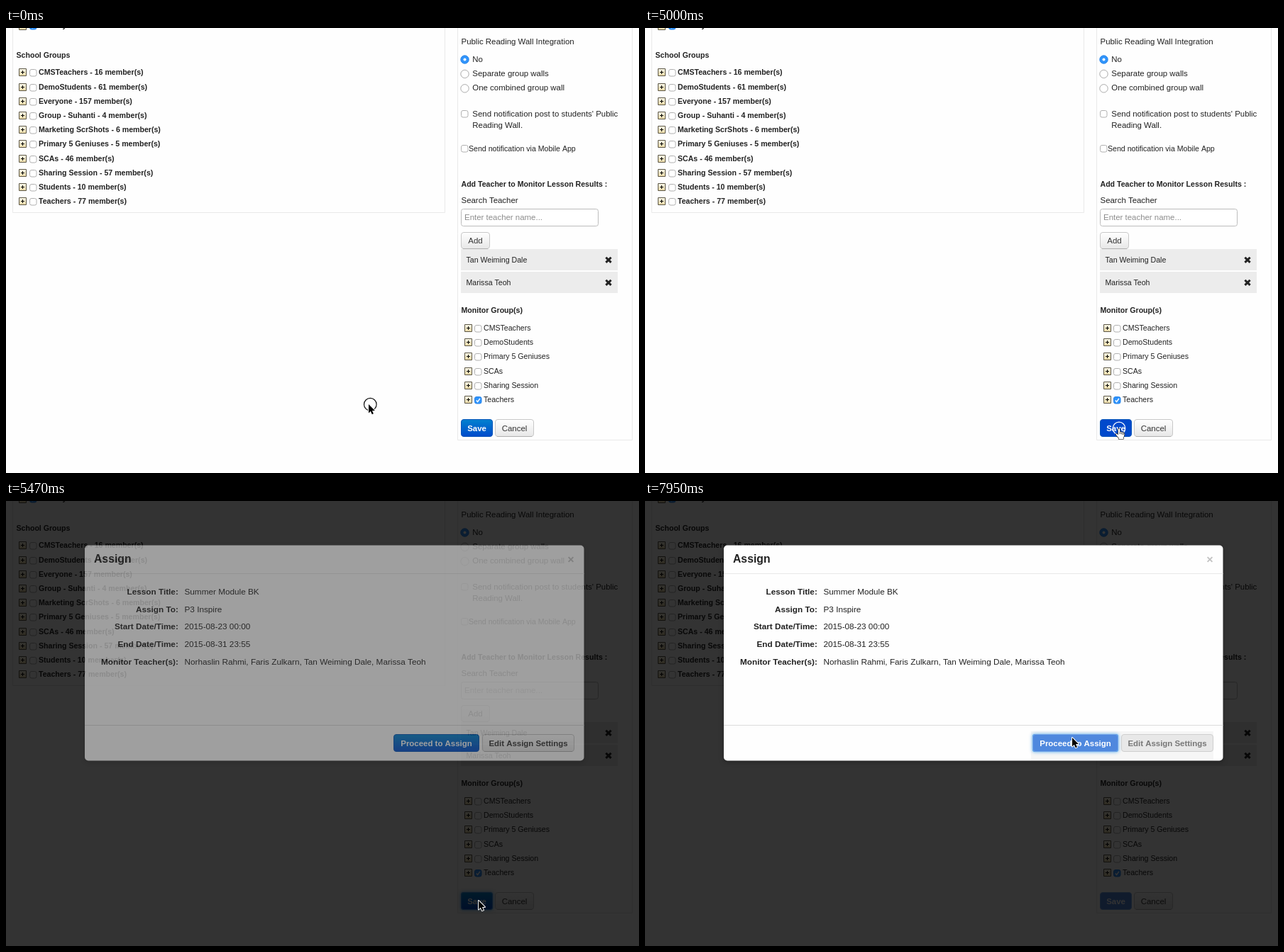
An HTML page with a canvas that plays this animation: 892x628 px, repeating every 8000 ms.

```html
<!DOCTYPE html>
<html lang="en">
<head>
<meta charset="utf-8">
<title>Assign lesson</title>
<style>
html, body { margin: 0; width: 892px; height: 628px; overflow: hidden; background: #fefefe; }
canvas { display: block; }
</style>
</head>
<body>
<canvas id="stage" width="892" height="628"></canvas>
<script>
const W = 892, H = 628, LOOP = 8000;
const main = document.getElementById('stage').getContext('2d');
const layer = Object.assign(document.createElement('canvas'), { width: W, height: H }).getContext('2d');
let g = main;
const FACE = '"Liberation Sans", Arial, sans-serif';
const SMALL = 10.6, BODY = 11.45, DIALOG = 11.75, INK = '#222';
const ROW = 20.23;

const groups = ['CMSTeachers - 16', 'DemoStudents - 61', 'Everyone - 157', 'Group - Suhanti - 4',
  'Marketing ScrShots - 6', 'Primary 5 Geniuses - 5', 'SCAs - 46', 'Sharing Session - 57',
  'Students - 10', 'Teachers - 77'];
const monitored = ['CMSTeachers', 'DemoStudents', 'Primary 5 Geniuses', 'SCAs', 'Sharing Session', 'Teachers'];
const teachers = ['Tan Weiming Dale', 'Marissa Teoh'];
const details = [
  ['Lesson Title:', 'Summer Module BK'],
  ['Assign To:', 'P3 Inspire'],
  ['Start Date/Time:', '2015-08-23 00:00'],
  ['End Date/Time:', '2015-08-31 23:55'],
  ['Monitor Teacher(s):', 'Norhaslin Rahmi, Faris Zulkarn, ' + teachers.join(', ')]
];

function text(s, x, y, size, { bold = false, color = INK, align = 'left' } = {}) {
  g.font = (bold ? 'bold ' : '') + size + 'px ' + FACE;
  g.fillStyle = color;
  g.textAlign = align;
  g.fillText(s, x, y);
}

function rect(x, y, w, h, color) {
  g.fillStyle = color;
  g.fillRect(x, y, w, h);
}

function box(x, y, w, h, r, fill, stroke) {
  g.beginPath();
  g.roundRect(x, y, w, h, r);
  if (fill) { g.fillStyle = fill; g.fill(); }
  if (stroke) { g.strokeStyle = stroke; g.lineWidth = 1; g.stroke(); }
}

function line(pts, color, width) {
  g.beginPath();
  pts.forEach(([x, y], i) => i ? g.lineTo(x, y) : g.moveTo(x, y));
  g.strokeStyle = color;
  g.lineWidth = width;
  g.stroke();
}

function shade(y, h, top, bottom) {
  const s = g.createLinearGradient(0, y, 0, y + h);
  s.addColorStop(0, top);
  s.addColorStop(1, bottom);
  return s;
}

// Paints onto the layer, then lays it over the stage as one translucent sheet.
function fade(alpha, paint) {
  g = layer;
  g.clearRect(0, 0, W, H);
  paint();
  g = main;
  g.globalAlpha = alpha;
  g.drawImage(layer.canvas, 0, 0);
  g.globalAlpha = 1;
}

function plus(x, y) {
  box(x + .5, y + .5, 10, 10, 0, shade(y, 11, '#fffdf0', '#ecd9a4'), '#5a5544');
  rect(x + 3, y + 5, 5, 1, '#000');
  rect(x + 5, y + 3, 1, 5, '#000');
}

function check(x, y, on) {
  box(x + .5, y + .5, 9.5, 9.5, 2.5, on ? '#3094fb' : '#fff', on ? '#2583ea' : '#b0b0b0');
  if (on) line([[x + 2.8, y + 5.5], [x + 4.6, y + 7.6], [x + 7.9, y + 2.8]], '#fff', 1.5);
}

function radio(x, y, on) {
  g.beginPath();
  g.arc(x, y, 5.7, 0, 7);
  g.fillStyle = on ? '#3094fb' : '#fff';
  g.fill();
  g.strokeStyle = on ? '#2583ea' : '#aaa';
  g.lineWidth = 1;
  g.stroke();
  if (!on) return;
  g.beginPath();
  g.arc(x, y, 2, 0, 7);
  g.fillStyle = '#fff';
  g.fill();
}

function plainButton(x, y, w, h, label, bold, off) {
  box(x + .5, y + .5, w - 1, h - 1, 3.5, off ? '#e8e8e8' : shade(y, h, '#fff', '#e7e7e7'), off ? '#cfcfcf' : '#c8c8c8');
  if (!off) rect(x + 3, y + h - 1, w - 6, 1, '#b0b0b0');
  text(label, x + w / 2, y + h / 2 + 4, BODY, { bold, align: 'center', color: off ? '#777' : '#333' });
}

function primaryButton(x, y, w, h, label, { hover, glow, off }) {
  g.save();
  if (glow) {
    g.shadowColor = '#52a8ec';
    g.shadowBlur = 5;
    box(x, y, w, h, 3, '#52a8ec');
    g.shadowBlur = 0;
  }
  const fill = off ? '#4f88de' : hover ? '#0049cc' : shade(y, h, '#0083cf', '#0049cb');
  box(x + .5, y + .5, w - 1, h - 1, 3.5, fill, off ? '#73a5e8' : glow ? '#3c8ce0' : '#0353b8');
  text(label, x + w / 2, y + h / 2 + 4, BODY, { bold: true, align: 'center', color: '#fff' });
  g.restore();
}

function groupPanel() {
  line([[9.5, 0], [9.5, 260.5], [618.5, 260.5], [618.5, 0]], '#e9e9e9', 1);
  plus(18, -8);
  check(33, -8, true);
  text('Primary', 46, 0, SMALL, { bold: true });
  text('School Groups', 14.5, 41.5, SMALL, { bold: true });
  groups.forEach((name, i) => {
    const y = Math.round(66.3 + i * ROW);
    plus(18, y - 9);
    check(33, y - 8, false);
    text(name + ' member(s)', 46, y, SMALL, { bold: true });
  });
}

function settingsPanel(s) {
  line([[636.5, 0], [636.5, 581.5], [882.5, 581.5], [882.5, 0]], '#e9e9e9', 1);
  text('Public Reading Wall Integration', 641.5, 23, BODY);
  ['No', 'Separate group walls', 'One combined group wall'].forEach((label, i) => {
    radio(646.5, 44.5 + i * 20.4, i === 0);
    text(label, 657.3, 48 + i * ROW, BODY);
  });
  check(641, 116, false);
  text("Send notification post to students' Public", 657.3, 125.3, BODY);
  text('Reading Wall.', 657.3, 141, BODY);
  check(641, 165, false);
  text('Send notification via Mobile App', 652, 173.5, SMALL);

  text('Add Teacher to Monitor Lesson Results :', 641.5, 223.5, SMALL, { bold: true });
  text('Search Teacher', 641.5, 246.5, BODY);
  box(641.5, 255.5, 193, 24, 3, '#fff', '#bcbcbc');
  text('Enter teacher name...', 646, 271, BODY, { color: '#8c8c8c' });
  plainButton(641, 288, 41, 24, 'Add');
  teachers.forEach((name, i) => {
    const y = 312 + i * 32;
    rect(641, y, 221, 30, '#ececec');
    text(name, 648.5, y + 19, SMALL);
    for (const d of [-3.6, 3.6]) line([[849 - 3.6, y + 15.3 - d], [849 + 3.6, y + 15.3 + d]], '#222', 3);
  });

  text('Monitor Group(s)', 641.5, 402, SMALL, { bold: true });
  monitored.forEach((name, i) => {
    const y = Math.round(427 + i * ROW), on = name === 'Teachers';
    plus(646, y - 9);
    check(660, y - 8, on);
    text(name, 673, y, SMALL);
  });
  primaryButton(641, 552, 45, 25, 'Save', s.save);
  plainButton(689, 552, 55, 25, 'Cancel');
}

function dialog(s) {
  g.save();
  g.shadowColor = 'rgba(0,0,0,.3)';
  g.shadowBlur = 6;
  g.shadowOffsetY = 2;
  box(111, 62.5, 703.5, 304, 5, '#fefefe');
  g.restore();
  rect(111, 102, 703.5, 1, '#e8e8e8');
  rect(111, 316, 703.5, 1, '#dcdcdc');
  if (s.sent) rect(544, 325, 257, 41, '#f6f6f6');
  text('Assign', 124, 87, 15.75, { bold: true });
  for (const d of [-3.4, 3.4]) line([[792.6, 82.5 - d], [799.4, 82.5 + d]], '#c3c3c3', 1.9);
  details.forEach(([label, value], i) => {
    const y = 132 + i * 24.65;
    text(label, 242.8, y, DIALOG, { bold: true, align: 'right' });
    text(value, 251.5, y, DIALOG);
  });
  primaryButton(546, 329, 121, 25, 'Proceed to Assign', s.proceed);
  plainButton(671, 329, 130, 25, 'Edit Assign Settings', true, s.sent);
}

function ring(x, y, color) {
  g.beginPath();
  g.arc(x, y, 8.8, 0, 7);
  g.strokeStyle = color;
  g.lineWidth = 1.2;
  g.stroke();
}

function pointer(x, y, hand) {
  const p = hand
    ? 'M-1.2 1.2Q0-.6 1.3 1.2V5.2Q2.8 4.3 3.6 5.6Q5 4.9 5.7 6.2Q7.5 6 7.5 8Q7.6 11 6 13V15H-.5V13.5L-4.4 8.9Q-4.6 7.2-3 7.6L-1.2 9.2Z'
    : 'M0 0V12.4L2.8 9.8L4.8 14.2L6.9 13.3L5 9H8.9Z';
  const path = new Path2D(p);
  g.save();
  g.translate(x, y);
  g.lineJoin = 'round';
  g.strokeStyle = hand ? '#000' : '#fff';
  g.lineWidth = hand ? 1.2 : 2;
  g.stroke(path);
  g.fillStyle = hand ? '#fff' : '#000';
  g.fill(path);
  if (hand) {
    for (const [fx, fy] of [[1.3, 5.2], [3.6, 5.6], [5.7, 6.4]]) line([[fx, fy], [fx, fy + 2.8]], '#000', .8);
  }
  g.restore();
}

const smooth = u => u * u * (3 - 2 * u);
const smoother = u => u * u * u * (10 + u * (6 * u - 15));

// Stepped travel: the first step is already taken at the start time.
function glide(t, start, end, steps, ease, from, to) {
  const i = Math.floor((t - start + 5) / ((end - start) / (steps - 1))) + 1;
  const u = ease(Math.max(0, Math.min(1, i / steps)));
  return from.map((v, k) => v + (to[k] - v) * u);
}

function cursor(t) {
  if (t < 2160) return [511, 531];
  if (t < 5000) return glide(t, 2160, 2850, 7, smooth, [511, 531], [666, 566]);
  if (t < 5240) return [668, 565];
  if (t < 6180) return [666, 564];
  if (t < 7010) return glide(t, 6180, 6770, 6, smoother, [666, 564], [601, 353]);
  return t < 7120 ? [602, 338] : [602, 334];
}

function draw(t) {
  const covered = t >= 5240, sent = t >= 7950;
  const state = {
    sent,
    save: { hover: t >= 3570 && !covered, glow: covered && !sent, off: sent },
    proceed: { hover: t >= 7010, glow: sent, off: sent }
  };
  rect(0, 0, W, H, '#fefefe');
  if (covered && t < 5360) {
    rect(14, 23, 599, 29, '#eee');
    rect(641, 205, 237, 29, '#eee');
    rect(641, 384, 237, 29, '#eee');
  }
  groupPanel();
  settingsPanel(state);

  if (covered) rect(0, 0, W, H, 'rgba(0,0,0,' + (t < 5360 ? .44 : .8) + ')');
  if (t >= 5360) {
    const tick = [5710, 5590, 5470, 5360].find(k => t >= k);
    fade(Math.min(1, (tick - 5310) / 300), () => dialog(state));
  }

  const [x, y] = cursor(t);
  if (t < 120) ring(513.3, 531.2, '#111');
  if (t >= 5000 && !covered) ring(668, 565, '#fff');
  if (t >= 7840 && !sent) ring(603, 335, '#fff');
  pointer(Math.round(x), Math.round(y), t >= 5000 && !covered || t >= 7010 && !sent);
}

const began = performance.now();
function tick() {
  draw((performance.now() - began) % LOOP);
  requestAnimationFrame(tick);
}
tick();
</script>
</body>
</html>
```
